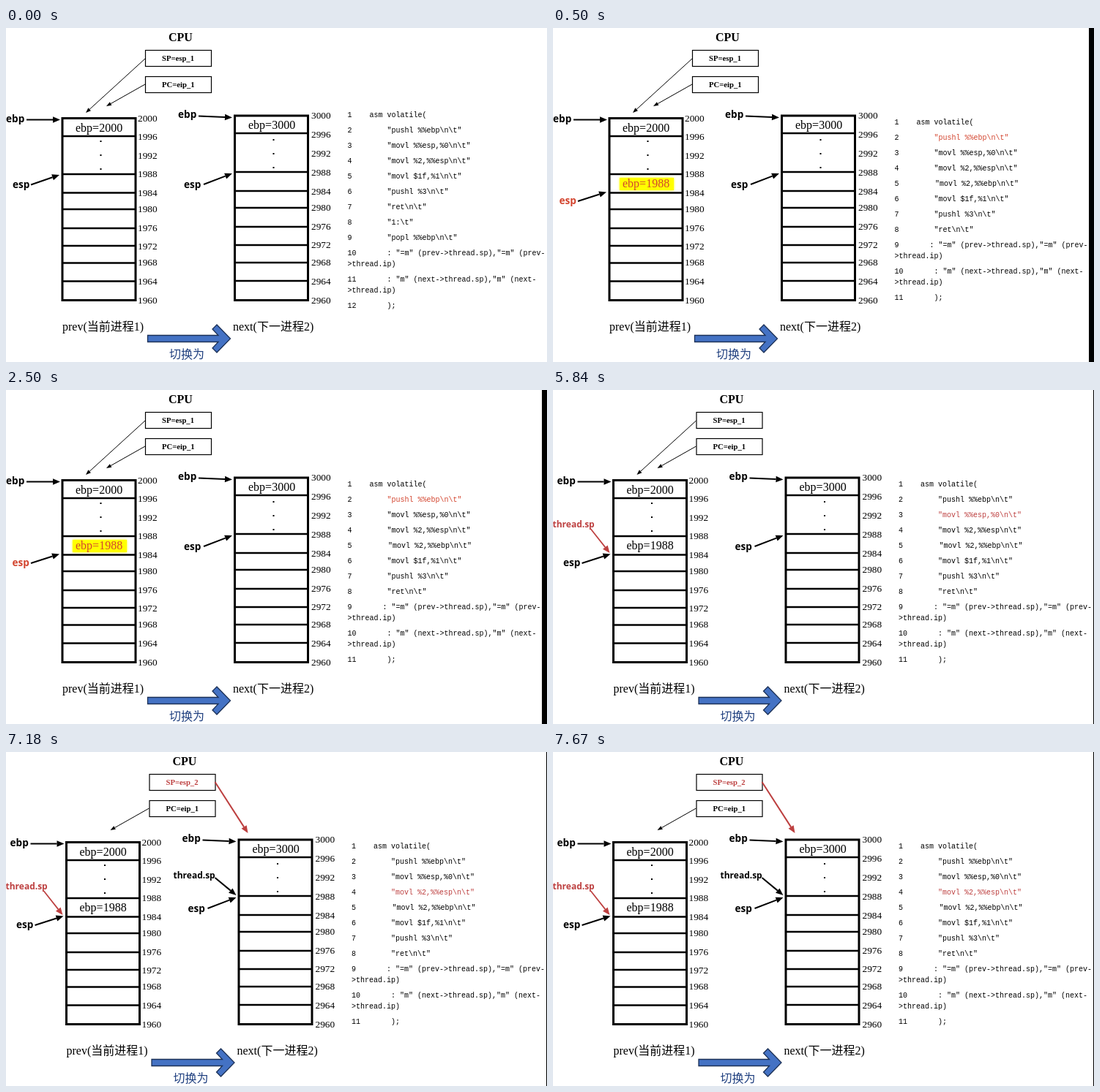
These frames come from a looping animation (739 by 457 pixels, 8000 ms). An HTML page with a canvas:

```html
<!DOCTYPE html>
<html lang="zh">
<head>
<meta charset="utf-8">
<title>Process switch</title>
<style>
html, body { margin: 0; width: 100%; height: 100%; overflow: hidden; background: #fff; }
canvas { display: block; }
</style>
</head>
<body>
<canvas id="stage" width="739" height="457"></canvas>
<script>
const ctx = document.getElementById('stage').getContext('2d');
const LOOP = 8000;
const STARTS = [0, 500, 3840, 7180];
const RED = '#bd4040', BRIGHT = '#d3452f';
const SERIF = '"Liberation Serif", "Noto Sans CJK SC", "Noto Sans CJK", serif';
const SANS = '"Open Sans", "Noto Sans", sans-serif';
const MONO = '"Liberation Mono", monospace';

const LEFT = {
  x: 77, w: 100, top: 2000, labelX: 180, textX: 95, textY: 141.5, dotY: 155,
  lines: [123.5, 148, 200, 225.5, 248, 274, 298, 321.5, 346.5, 372.5],
  labels: [123, 148, 174, 199, 225, 247, 273, 298, 320, 346, 372]
};
const RIGHT = {
  x: 312.5, w: 100, top: 3000, labelX: 417, textX: 331, textY: 138, dotY: 153,
  lines: [120, 144, 197, 223, 246, 272, 297, 321, 346, 372.5],
  labels: [119, 145, 171, 197, 223, 245, 271, 296, 320, 346, 372]
};

const OPERANDS = [
  [': "=m" (prev->thread.sp),"=m" (prev-', '>thread.ip)'],
  [': "m" (next->thread.sp),"m" (next-', '>thread.ip)'],
  [');']
];
const quote = s => ['"' + s + '"'];
const listing = body => [['asm volatile('], ...body.map(quote), ...OPERANDS];
const FIRST = listing(['pushl %%ebp\\n\\t', 'movl %%esp,%0\\n\\t', 'movl %2,%%esp\\n\\t',
  'movl $1f,%1\\n\\t', 'pushl %3\\n\\t', 'ret\\n\\t', '1:\\t', 'popl %%ebp\\n\\t']);
const SECOND = listing(['pushl %%ebp\\n\\t', 'movl %%esp,%0\\n\\t', 'movl %2,%%esp\\n\\t',
  'movl %2,%%ebp\\n\\t', 'movl $1f,%1\\n\\t', 'pushl %3\\n\\t', 'ret\\n\\t']);

function text(s, x, y, font, color = '#000') {
  ctx.font = font;
  ctx.fillStyle = color;
  ctx.fillText(s, x, y);
}

const serif = (s, x, y, size, color) => text(s, x, y, `${size}px ${SERIF}`, color);
const bold = (s, x, y, size, color) => text(s, x, y, `bold ${size}px ${SERIF}`, color);
const tag = (s, x, y, color, size = 13.6) => text(s, x, y, `bold ${size}px ${SANS}`, color);

function line(x1, y1, x2, y2, width, color = '#000') {
  ctx.strokeStyle = color;
  ctx.lineWidth = width;
  ctx.beginPath();
  ctx.moveTo(x1, y1);
  ctx.lineTo(x2, y2);
  ctx.stroke();
}

function polygon(points) {
  ctx.beginPath();
  points.forEach(([x, y]) => ctx.lineTo(x, y));
  ctx.closePath();
}

function arrow(x1, y1, x2, y2, width = 2, color = '#000') {
  const a = Math.atan2(y2 - y1, x2 - x1);
  const c = Math.cos(a), s = Math.sin(a);
  const len = width > 1.5 ? 10 : 7, half = width > 1.5 ? 4.2 : 2.6;
  const bx = x2 - len * c, by = y2 - len * s;
  line(x1, y1, bx, by, width, color);
  polygon([[x2, y2], [bx - half * s, by + half * c], [bx + half * s, by - half * c]]);
  ctx.fillStyle = color;
  ctx.fill();
}

function drawStack(st) {
  const { x, w, lines } = st, end = lines[lines.length - 1];
  ctx.strokeStyle = '#000';
  ctx.lineWidth = 3;
  ctx.strokeRect(x, lines[0], w, end - lines[0]);
  lines.slice(1, -1).forEach(y => line(x, y, x + w, y, 2.6));
  st.labels.forEach((y, i) => serif(st.top - 4 * i, st.labelX, y + 4.5, 13.33));
  serif('ebp=' + st.top, st.textX, st.textY, 16);
  ctx.fillStyle = '#000';
  for (let i = 0; i < 3; i++) ctx.fillRect(st.textX + 33.5, st.dotY + 19 * i - 1, 2, 2);
}

function drawRegister(s, y, color) {
  ctx.strokeStyle = '#000';
  ctx.lineWidth = 1.2;
  ctx.strokeRect(190.5, y + 0.5, 90, 22);
  bold(s, 213, y + 14.5, 10.67, color);
}

function drawCpu(scene) {
  bold('CPU', 222, 18, 16);
  const moved = scene === 3;
  drawRegister(moved ? 'SP=esp_2' : 'SP=esp_1', 30, moved ? RED : '#000');
  drawRegister('PC=eip_1', 66);
  if (moved) arrow(280, 41, 325, 111, 2, RED);
  else arrow(190, 42, 109, 116, 1);
  arrow(190, 77, 137, 107, 1);
}

function drawPointers(scene) {
  tag('ebp', 0, 129);
  arrow(28, 125.5, 74, 125.5);
  tag('ebp', 235, 123);
  arrow(263, 120.5, 309, 122.5);
  tag('esp', 243, 219);
  arrow(270, 214, 309, 199);
  if (scene === 0) {
    tag('esp', 9, 219);
    arrow(34, 214.5, 73, 201);
  } else {
    tag('esp', 8.5, 241, scene === 1 ? BRIGHT : '#000');
    arrow(34, 237, 73, 224.5);
  }
  if (scene > 1) {
    tag('thread.sp', -6, 188, RED, 12);
    arrow(46, 190, 72, 223, 1.7, RED);
  }
  if (scene === 3) {
    tag('thread.sp', 223, 173, '#000', 12);
    arrow(280, 172, 309, 196);
  }
}

function drawPushed(scene) {
  if (scene === 0) return;
  if (scene === 1) {
    ctx.save();
    ctx.shadowColor = '#ff0';
    ctx.shadowBlur = 3;
    ctx.fillStyle = '#ff0';
    ctx.fillRect(91, 205, 74, 17);
    ctx.restore();
  }
  serif('ebp=1988', 95, 218, 16, scene === 1 ? BRIGHT : '#000');
}

function drawSwitch() {
  serif('prev(当前进程1)', 77, 414, 16);
  serif('next(下一进程2)', 310, 414, 16);
  polygon([[193.5, 420.5], [290, 420.5], [282, 412], [288, 406], [306.5, 425],
    [288, 444], [282, 438], [290, 429.5], [193.5, 429.5]]);
  ctx.fillStyle = '#4472c4';
  ctx.fill();
  ctx.strokeStyle = '#1c3157';
  ctx.lineWidth = 1.3;
  ctx.stroke();
  serif('切换为', 223, 452, 16, '#1f3f7f');
}

function drawCode(scene) {
  const rows = scene ? SECOND : FIRST;
  const mono = (s, x, y, color) => text(s, x, y, `10px ${MONO}`, color);
  let y = scene ? 132 : 122;
  rows.forEach((parts, i) => {
    let x = i ? 520.5 : 496.5;
    if (scene && i === 4) x += 1.5;
    if (scene && i === 8) x -= 6;
    const color = scene && i === scene ? (scene === 1 ? BRIGHT : RED) : '#000';
    mono(i + 1, 466.5, y, '#000');
    mono(parts[0], x, y, color);
    if (parts[1]) {
      y += 15;
      mono(parts[1], 466.5, y, '#000');
    }
    y += 21;
  });
}

function draw(scene) {
  ctx.fillStyle = '#fff';
  ctx.fillRect(0, 0, 739, 457);
  ctx.save();
  if (scene > 1) ctx.translate(5.5, 0);
  drawCpu(scene);
  drawPushed(scene);
  drawStack(LEFT);
  drawStack(RIGHT);
  drawPointers(scene);
  drawSwitch();
  drawCode(scene);
  ctx.restore();
  if (scene) {
    const edge = scene === 1 ? 732 : 738;
    ctx.fillStyle = '#000';
    ctx.fillRect(edge, 0, 739 - edge, 457);
  }
}

const begin = performance.now();
function tick() {
  const t = (performance.now() - begin) % LOOP;
  draw(STARTS.filter(s => s <= t).length - 1);
  requestAnimationFrame(tick);
}
tick();
</script>
</body>
</html>
```
